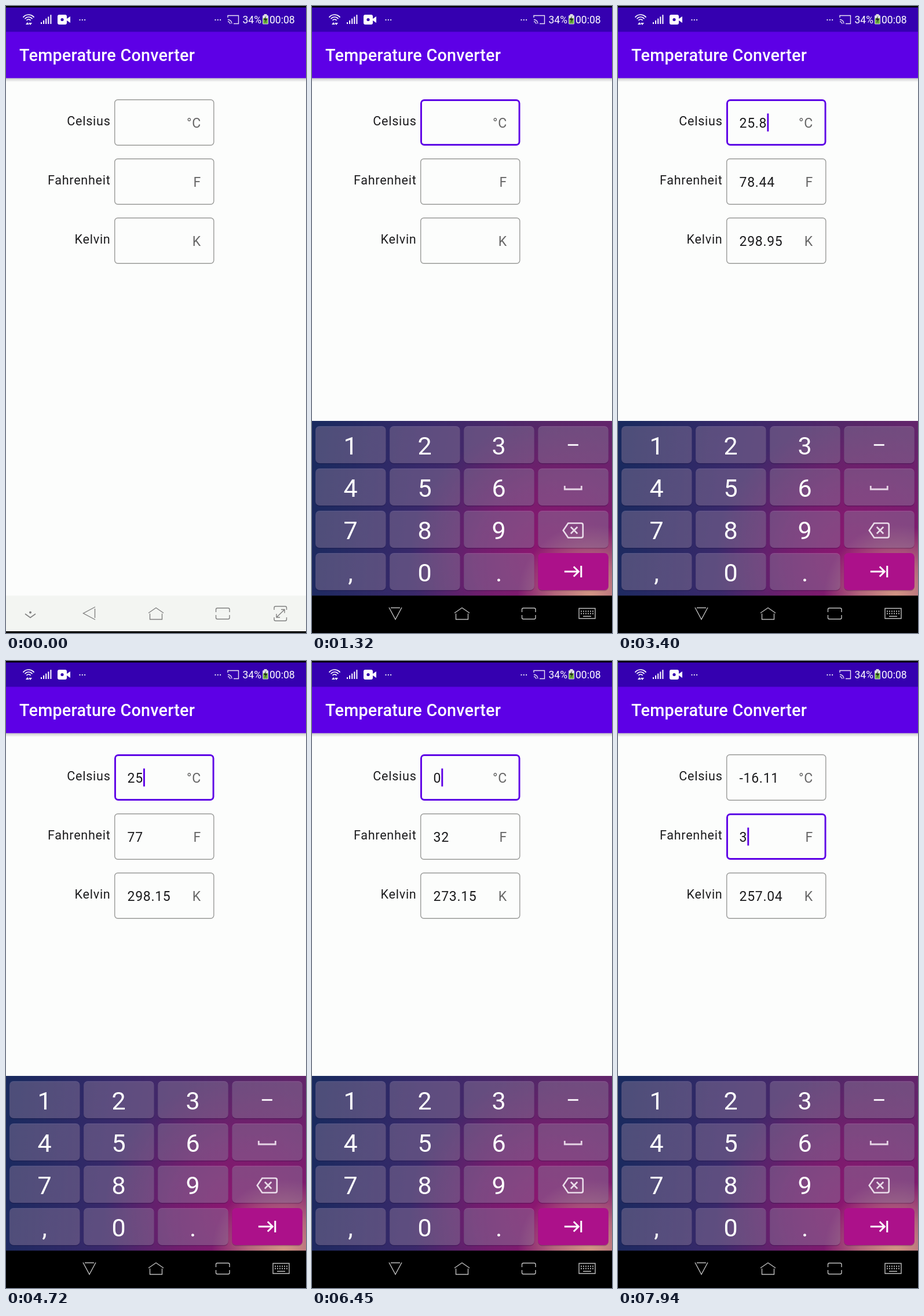
Animation, 518 px wide and 1082 px high, one loop 8 s. Source, as an HTML page with a canvas:

```html
<!DOCTYPE html>
<html lang="en">
<head>
<meta charset="utf-8">
<title>Temperature Converter</title>
<style>
html, body { margin: 0; width: 100%; height: 100%; overflow: hidden; background: #000; }
canvas { display: block; }
</style>
</head>
<body>
<canvas id="stage" width="518" height="1082"></canvas>
<script>
const ctx = document.getElementById('stage').getContext('2d');
const LOOP = 8000, W = 518;
const PURPLE = '#5d00e6', INK = '#1b1b1d';
const KEYS = ['1', '2', '3', '-', '4', '5', '6', 'space', '7', '8', '9', 'del', ',', '0', '.', 'next'];
const FOCUS_C = 690, FOCUS_F = 7200, KEY_FADE = 100;

// key, time down, time up
const PRESSES = [
  ['2', 2070, 2180], ['5', 2320, 2430], ['.', 2880, 2990], ['8', 3140, 3250],
  ['del', 4290, 4370], ['del', 4540, 4610], ['del', 4790, 4860], ['del', 5000, 5070],
  ['0', 5370, 5490], ['del', 7770, 7830]
];
const CURSOR_OFF = [[1265, 1730], [3745, 4260], [5990, 6450], [6940, 7200], [7710, 7770]];

const clamp01 = v => Math.max(0, Math.min(1, v));
const ramp = (t, a, b) => clamp01((t - a) / (b - a));
const mix = (a, b, k) => a + (b - a) * k;
const gray = v => `rgb(${v | 0},${v | 0},${v | 0})`;
const show = v => String(Number(v.toFixed(2)));

function rect(x, y, w, h, color) {
  ctx.fillStyle = color;
  ctx.fillRect(x, y, w, h);
}

function round(x, y, w, h, r, color) {
  ctx.beginPath();
  ctx.roundRect(x, y, w, h, r);
  ctx.fillStyle = color;
  ctx.fill();
}

function text(str, x, y, size, color, align = 'left', spacing = 0, weight = 400) {
  ctx.font = `${weight} ${size}px Roboto, sans-serif`;
  ctx.letterSpacing = spacing + 'px';
  ctx.textAlign = align;
  ctx.fillStyle = color;
  ctx.fillText(str, x, y);
}

function strokePath(d, color, width) {
  ctx.strokeStyle = color;
  ctx.lineWidth = width;
  ctx.stroke(new Path2D(d));
}

function dots(x) {
  for (let i = 0; i < 3; i++) rect(x + i * 4.3, 23, 2, 2, '#e6e0f4');
}

function statusBar() {
  rect(0, 0, W, 3, '#000');
  rect(0, 2.5, W, 42, '#3500b0');
  ctx.lineCap = 'round';
  for (const r of [4, 8, 12]) {
    ctx.beginPath();
    ctx.arc(39, 27, r, -Math.PI * 0.77, -Math.PI * 0.23);
    ctx.strokeStyle = '#fff';
    ctx.lineWidth = 1.7;
    ctx.stroke();
  }
  ctx.lineCap = 'butt';
  ctx.fillStyle = '#fff';
  ctx.fill(new Path2D('M34 32l3-4 3 4zM39 29h6l-3 4z'));
  for (let i = 0; i < 5; i++) rect(60 + i * 4.1, 28 - i * 3.2, 2, 3 + i * 3.2, '#fff');
  round(89, 15, 16, 17, 3, '#fff');
  ctx.fill(new Path2D('M105 22l6-4v11l-6-4z'));
  ctx.beginPath();
  ctx.arc(97, 23.5, 2.6, 0, 7);
  ctx.fillStyle = '#3500b0';
  ctx.fill();
  dots(126.5);
  dots(360.5);
  strokePath('M383 20V16.5H401.5V30.5H393M383 23.5A7 7 0 0 1 390 30.5M383 27A4 4 0 0 1 387 31', '#e9e4f5', 1.4);
  text('34%', 408.5, 30, 17.5, '#fff');
  rect(445.5, 14, 5, 2, '#ddd');
  round(443, 16, 10, 15.5, 1.5, '#dcdce8');
  rect(444, 21, 8, 9.5, '#6cae3f');
  ctx.fillStyle = '#222';
  ctx.fill(new Path2D('M449 17l-4 7h3l-1 5 4-7h-3z'));
  text('00:08', 455, 30, 17.5, '#fff');
}

function appBar() {
  const shadow = ctx.createLinearGradient(0, 124, 0, 131);
  shadow.addColorStop(0, 'rgba(0,0,0,.22)');
  shadow.addColorStop(1, 'rgba(0,0,0,0)');
  rect(0, 124, W, 7, shadow);
  rect(0, 44, W, 80.5, PURPLE);
  text('Temperature Converter', 23, 95, 28.8, '#fff', 'left', 0.216, 500);
}

function field(i, label, unit, value, focus, cursor) {
  const y = 161 + i * 102;
  text(label, 180.5, y + 45, 21.6, INK, 'right', 0.72);
  const line = mix(1.4, 2.9, focus), inset = line / 2;
  ctx.beginPath();
  ctx.roundRect(187 + inset, y + inset, 172.5 - line, 80 - line, 5.5);
  ctx.strokeStyle = focus > 0.3 ? PURPLE : '#999a98';
  ctx.lineWidth = line;
  ctx.stroke();
  text(unit, 337, y + 49, 23, '#666', 'right', 0.72);
  text(value, 209.5, y + 49, 23, INK, 'left', 0.72);
  if (cursor) rect(209.7 + ctx.measureText(value).width, y + 24.5, 2.9, 31, PURPLE);
}

function keyIcon(key, x, y) {
  if (key === '-') rect(x - 9, y - 1, 18, 3, '#f4eef6');
  else if (key === 'space') strokePath(`M${x - 14.5} ${y - 4}v6h29v-6`, '#e6d5e6', 2.8);
  else if (key === 'del') {
    strokePath(`M${x - 17} ${y + 2}l8.5 -12.5h22.5q3 0 3 3v19q0 3-3 3h-22.5z`, '#eadcea', 2.6);
    strokePath(`M${x - 4} ${y - 4}l11.5 11.5m0 -11.5l-11.5 11.5`, '#eadcea', 2.6);
  } else strokePath(`M${x - 15} ${y}h24m-8 -8.5l8.5 8.5l-8.5 8.5M${x + 14} ${y - 10}v20`, '#fff', 3);
}

function highlight(key, t) {
  let level = 0;
  for (const [k, down, up] of PRESSES)
    if (k === key && t >= down) level = Math.max(level, 1 - ramp(t, up, up + KEY_FADE));
  return level;
}

function glow(x, y, r, rgb, alpha) {
  const g = ctx.createRadialGradient(x, y, 0, x, y, r);
  g.addColorStop(0, `rgba(${rgb},${alpha})`);
  g.addColorStop(0.5, `rgba(${rgb},${alpha * 0.6})`);
  g.addColorStop(1, `rgba(${rgb},0)`);
  rect(0, 716, W, 302, g);
}

function keyboard(t) {
  const base = ctx.createLinearGradient(0, 830, W, 900);
  base.addColorStop(0, '#1a2a5f');
  base.addColorStop(0.35, '#38296a');
  base.addColorStop(0.75, '#572768');
  base.addColorStop(1, '#66246c');
  rect(0, 716, W, 302, base);
  glow(400, 950, 230, '160,16,116', 0.75);
  glow(480, 1020, 125, '220,165,135', 0.9);
  KEYS.forEach((key, i) => {
    const x = 6 + (i % 4) * 128.1, y = 725 + (i >> 2) * 73;
    round(x, y + 1.5, 121.5, 64, 7, 'rgba(20,10,50,.25)');
    round(x, y, 121.5, 64, 7, key === 'next' ? '#ac118a' : 'rgba(208,185,215,.29)');
    const lit = highlight(key, t);
    if (lit) round(x, y, 121.5, 64, 7, `rgba(240,238,250,${0.52 * lit})`);
    const cx = x + 60.5;
    if (/[\d.,]/.test(key)) text(key, cx, y + 49, 43, '#fff', 'center');
    else keyIcon(key, cx, y + (key === 'space' ? 107 - 73 : 32));
  });
}

function navBar(t) {
  const swapped = t >= 1040, dark = ramp(t, 1220, 1315);
  rect(0, 1017.5, W, 65, dark ? gray(mix(244, 0, dark)) : '#f3f5f2');
  const tone = mix(mix(128, 216, ramp(t, 1040, 1200)), 190, dark);
  const color = gray(tone);

  ctx.save();
  ctx.translate(144, 1048);
  ctx.rotate(-Math.PI / 2 * ramp(t, 1040, 1180));
  strokePath('M10 -11L-10.5 0L10 11M9.5 -8V8', color, 1.4);
  ctx.restore();

  strokePath('M246 1047.5L259 1038.5L272 1047.5M248.5 1048.5V1058.5H269.5V1048.5', color, 1.4);
  strokePath('M362.5 1046V1041.5Q362.5 1039 365 1039H383.5Q386 1039 386 1041.5V1046M362.5 1051V1055.5Q362.5 1058 365 1058H383.5Q386 1058 386 1055.5V1051', color, 1.4);

  if (swapped) {
    strokePath('M461 1039.5H489V1057H461Z', color, 1.4);
    for (let row = 0; row < 2; row++)
      for (let i = 0; i < 6; i++) rect(464 + i * 4, 1043.5 + row * 4, 2, 2, color);
    rect(468, 1052.5, 14, 1.5, color);
  } else {
    strokePath('M33 1049L42 1055.5L51 1049', color, 1.6);
    ctx.beginPath();
    ctx.arc(42, 1046.5, 2, 0, 7);
    ctx.fillStyle = color;
    ctx.fill();
    strokePath('M463 1042V1038.5Q463 1036 465.5 1036H482Q484.5 1036 484.5 1038.5V1042M463 1055V1058.5Q463 1061 465.5 1061H482Q484.5 1061 484.5 1058.5V1055', color, 1.4);
    strokePath('M467 1055L481 1041.5M475 1041.5H481V1047.5M467 1049V1055H473', color, 1.4);
  }
  rect(0, 1079, W, 3, '#000');
}

// Replay the key presses up to t and convert the edited value.
function readings(t) {
  let celsius = '', fahrenheit = '', kelvin = '';
  for (const [key, down, up] of PRESSES) {
    if (t < (key === 'del' ? down : up)) break;
    const inF = down > FOCUS_F;
    let s = inF ? fahrenheit : celsius;
    s = key === 'del' ? s.slice(0, -1) : s + key;
    const n = Number(s), c = inF ? (n - 32) * 5 / 9 : n;
    celsius = !inF ? s : s && show(c);
    fahrenheit = inF ? s : s && show(c * 9 / 5 + 32);
    kelvin = s && show(c + 273.15);
  }
  return [celsius, fahrenheit, kelvin];
}

function draw(t) {
  rect(0, 0, W, 1082, '#fcfdfc');
  appBar();
  statusBar();
  const [c, f, k] = readings(t);
  const toF = ramp(t, FOCUS_F, FOCUS_F + 120);
  const focusC = ramp(t, FOCUS_C - 60, FOCUS_C + 90) * (1 - toF);
  const blinkOn = t >= FOCUS_C && !CURSOR_OFF.some(([a, b]) => t >= a && t < b);
  field(0, 'Celsius', '°C', c, focusC, blinkOn && t < FOCUS_F);
  field(1, 'Fahrenheit', 'F', f, toF, blinkOn && t >= FOCUS_F);
  field(2, 'Kelvin', 'K', k, 0, false);
  const slide = ramp(t, 1215, 1315);
  if (slide) {
    ctx.save();
    ctx.translate(0, 302 * (1 - slide) ** 2);
    keyboard(t);
    ctx.restore();
  }
  navBar(t);
}

const start = performance.now();
function tick() {
  draw((performance.now() - start) % LOOP);
  requestAnimationFrame(tick);
}
tick();
</script>
</body>
</html>
```
